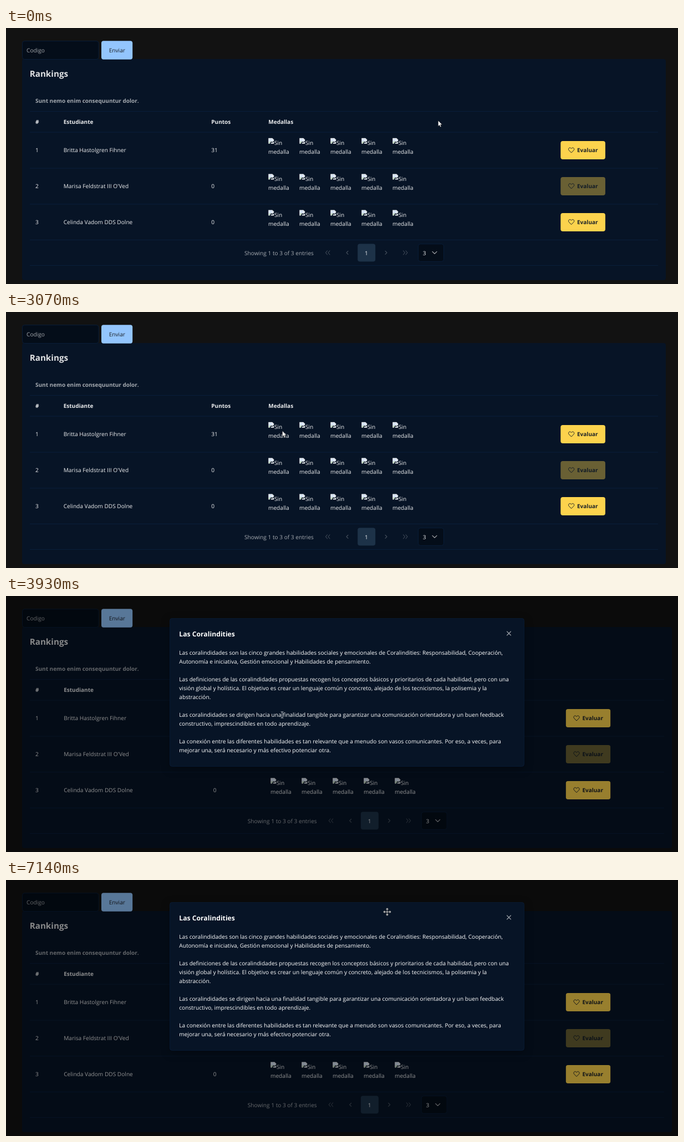
An HTML page for the animation above (7.39 s loop, 1212 by 462 pixels).

```html
<!DOCTYPE html>
<html lang="es">
<head>
<meta charset="utf-8">
<title>Rankings</title>
<style>
  html, body { margin: 0; width: 100%; height: 100%; overflow: hidden; background: #121212; }
  svg { display: block; width: 100vw; height: 100vh; }
  text { font: 10.15px "Open Sans", "Noto Sans", sans-serif; fill: #fff; fill-opacity: .93; text-rendering: geometricPrecision; }
  .b { font-weight: 700; font-size: 10px; }
  .dim { fill-opacity: .64; }
  .dark { fill: #1c2127; fill-opacity: 1; }
  .h1 { font-size: 15.2px; font-weight: 700; fill-opacity: .88; }
  .h2 { font-size: 12.2px; font-weight: 700; }
  .mid { text-anchor: middle; }
  .line { fill: #0b213f; }
  .field { fill: #040d19; stroke: #0b213f; stroke-width: .8; }
  .ico { fill: none; stroke: #fff; stroke-opacity: .6; stroke-width: 1.1; stroke-linecap: round; stroke-linejoin: round; }
  .off { opacity: .4; }

  .shift, .grow, #mask, #dialog, #cursor, #cursor > * { animation: 7390ms linear infinite; }
  .shift { animation-name: shift; }
  .grow { width: var(--w); animation-name: grow; }
  #mask { animation-name: mask; }
  #dialog { animation-name: open; transform-origin: 615px 174px; }
  #dialog text { fill-opacity: 1; }
  #panel { fill: #071426; stroke: #0b213f; stroke-width: .7; filter: drop-shadow(0 4px 8px rgba(0, 0, 0, .3)); }
  #cursor { animation-name: travel; }
  #cursor > * { animation-timing-function: step-end; }
  #arrow { animation-name: arrow; }
  #beam { animation-name: beam; }
  #move { animation-name: move; }

  /* the page widens when its scrollbar goes away */
  @keyframes shift {
    0%, 41.812% { transform: none; }
    41.813%, 100% { transform: translateX(var(--d)); }
  }
  @keyframes grow {
    0%, 41.812% { width: var(--w); }
    41.813%, 100% { width: calc(var(--w) + 11px); }
  }
  @keyframes mask {
    0% { opacity: 0; }
    42.2% { opacity: 0; animation-timing-function: ease; }
    43.9%, 100% { opacity: .4; }
  }
  @keyframes open {
    0% { opacity: 0; transform: scale(.7); }
    42.165% { opacity: 0; transform: scale(.7); animation-timing-function: cubic-bezier(0, 0, .2, 1); }
    43.802%, 100% { opacity: 1; transform: none; }
  }
  @keyframes travel {
    0%, 11.231% { transform: translate(779px, 167px); }
    16% { transform: translate(662px, 163px); }
    20.974%, 21.245% { transform: translate(555px, 166px); }
    24.493%, 25.846% { transform: translate(530px, 182px); }
    30.988%, 31.258% { transform: translate(527px, 264px); }
    35.183% { transform: translate(476px, 234px); }
    38.5% { transform: translate(492px, 207px); }
    40.189%, 53.18% { transform: translate(498px, 214.5px); }
    62.923%, 64.275% { transform: translate(507px, 181px); }
    64.276%, 64.54% { transform: translate(509px, 175px); }
    73.748%, 75.101% { transform: translate(580.5px, 79.5px); }
    81.597%, 81.867% { transform: translate(654.5px, 52px); }
    84.844%, 85.115% { transform: translate(671px, 52px); }
    89.445%, 93.64% { transform: translate(697px, 55px); }
    96.617%, 100% { transform: translate(687.5px, 57.5px); }
  }
  @keyframes arrow {
    0%, 55.548%, 67.524% { visibility: visible; }
    42.111%, 64.55%, 69.107%, 100% { visibility: hidden; }
  }
  @keyframes beam {
    0%, 55.548%, 67.524%, 72.273%, 100% { visibility: hidden; }
    42.111%, 64.55%, 69.107% { visibility: visible; }
  }
  @keyframes move {
    0% { visibility: hidden; }
    72.273%, 100% { visibility: visible; }
  }
</style>
</head>
<body>
<svg viewBox="0 0 1212 462">
  <defs>
    <g id="broken">
      <path d="M.3.3H7.3L10.3 3.3V5L7.4 7.2 5 6.2 2.6 10.3H.3Z" fill="#f4f6f8"/>
      <path d="M1.4 1.4H6.8V4H9.2V4.7L7.2 6.1 5 5.1 1.4 7.5Z" fill="#d3e2f6"/>
      <path d="M1.4 9.3V7.8L4.2 5.6 2.4 9.3Z" fill="#8fc183"/>
      <path d="M7.3.3V3.3H10.3Z" fill="#d5d9de"/>
      <path d="M4.4 10.3 6 7.8 7.6 8.6 10.3 6.6V10.3Z" fill="#eceff2"/>
    </g>
    <path id="heart" d="M5.3 9.6 1 5.2C-.6 3.5.3.6 2.7.6 4 .6 4.8 1.4 5.3 2.2 5.8 1.4 6.6.6 7.9.6 10.3.6 11.2 3.5 9.6 5.2Z" fill="none" stroke="#1c2127"/>
  </defs>

  <rect width="1212" height="462" fill="#121212"/>
  <rect class="grow" style="--w:1161px" x="29" y="56" height="399" rx="4" fill="#071426"/>
  <rect class="field" x="29.5" y="23.5" width="137.5" height="33" rx="4"/>
  <text class="dim" x="37" y="44">Codigo</text>
  <rect x="172" y="23.3" width="56.2" height="33.4" rx="4" fill="#93c5fd"/>
  <text class="dark mid" x="200.3" y="44">Enviar</text>
  <text class="h1" x="42.7" y="88.2">Rankings</text>
  <text class="b dim" x="53" y="135">Sunt nemo enim consequuntur dolor.</text>
  <g id="table"></g>

  <g class="shift" style="--d:5.7px">
    <text class="dim" x="430" y="409.5">Showing 1 to 3 of 3 entries</text>
    <g class="off">
      <path class="ico" d="M579.5 402 576.5 405.5 579.5 409M584 402 581 405.5 584 409"/>
      <path class="ico" d="M617 402.5 614 405.5 617 408.5"/>
      <path class="ico" d="M684 402.5 687 405.5 684 408.5"/>
      <path class="ico" d="M716.5 402 719.5 405.5 716.5 409M721 402 724 405.5 721 409"/>
    </g>
    <rect x="634.2" y="389.6" width="32" height="31.8" rx="4" fill="#1d3248"/>
    <text class="mid" x="650" y="409.5">1</text>
    <rect class="field" x="743.5" y="389.8" width="46" height="31.6" rx="4"/>
    <text x="751.7" y="409.5">3</text>
    <path class="ico" d="M769 403.5 773 407.5 777 403.5"/>
  </g>

  <rect id="mask" width="1212" height="462"/>

  <g id="dialog">
    <rect id="panel" x="295.6" y="40.4" width="638.8" height="267" rx="4"/>
    <text class="h2" x="312.3" y="72.5">Las Coralindities</text>
    <path class="ico" d="M903.5 64 910.5 71M910.5 64 903.5 71"/>
    <g id="body"></g>
  </g>

  <g id="cursor">
    <path id="arrow" d="M.4 0V10.4L2.8 8.2 4.3 11.8 6 11.1 4.5 7.5H7.7Z" fill="#fff" stroke="#000" stroke-width=".5"/>
    <path id="beam" d="M-2.3-5.5H-.6L0-5 .6-5.5H2.3M0-5V5M-2.3 5.5H-.6L0 5 .6 5.5H2.3" fill="none" stroke="#e4e6e9" stroke-width=".9"/>
    <path id="move" d="M0-7.2 2.8-4.2H.7V-.7H4.2V-2.8L7.2 0 4.2 2.8V.7H.7V4.2H2.8L0 7.2-2.8 4.2H-.7V.7H-4.2V2.8L-7.2 0-4.2-2.8V-.7H-.7V-4.2H-2.8Z" fill="#fff" stroke="#000" stroke-width=".5"/>
  </g>
</svg>
<script>
  const rows = [
    ["Britta Hastolgren Fihner", 31],
    ["Marisa Feldstrat III O'Ved", 0],
    ["Celinda Vadom DDS Dolne", 0]
  ];
  // line number in the dialog, then its text
  const lines = [
    [0, "Las coralindidades son las cinco grandes habilidades sociales y emocionales de Coralindities: Responsabilidad, Cooperación,"],
    [1, "Autonomía e iniciativa, Gestión emocional y Habilidades de pensamiento."],
    [3, "Las definiciones de las coralindidades propuestas recogen los conceptos básicos y prioritarios de cada habilidad, pero con una"],
    [4, "visión global y holística. El objetivo es crear un lenguaje común y concreto, alejado de los tecnicismos, la polisemia y la"],
    [5, "abstracción."],
    [7, "Las coralindidades se dirigen hacia una finalidad tangible para garantizar una comunicación orientadora y un buen feedback"],
    [8, "constructivo, imprescindibles en todo aprendizaje."],
    [10, "La conexión entre las diferentes habilidades es tan relevante que a menudo son vasos comunicantes. Por eso, a veces, para"],
    [11, "mejorar una, será necesario y más efectivo potenciar otra."]
  ];

  const text = (x, y, s, cls = "") => `<text class="${cls}" x="${x}" y="${y}">${s}</text>`;
  const shift = (d, inner) => `<g class="shift" style="--d:${d}px">${inner}</g>`;
  const rule = y => `<rect class="line grow" style="--w:1133px" x="43" y="${y}" height=".8"/>`;

  const medal = (x, y) =>
    `<use href="#broken" x="${x}" y="${y - 25.5}"/>` +
    text(x + 11, y - 13, "Sin") + text(x, y + 3, "medalla");

  const button = (y, off) =>
    `<g class="${off ? "off" : ""}">
      <rect x="1000.3" y="${Math.round(y - 20)}" width="80.6" height="33" rx="4" fill="#fcd34d"/>
      <use href="#heart" x="1014.3" y="${y - 8.5}"/>${text(1030, y, "Evaluar", "b dark")}
    </g>`;

  const row = ([name, points], i) => {
    const y = 224 + i * 64.8;
    const medals = [0, 1, 2, 3, 4].map(k => medal(473 + k * 56, y)).join("");
    return text(53, y, i + 1) +
      shift(.5, text(103.7, y, name)) +
      shift(3.5, text(370.3, y, points)) +
      shift(4, medals) +
      shift(9.4, button(y, i === 1));
  };

  document.getElementById("table").innerHTML =
    [150, 187.7, 252.7, 317.5, 382, 428].map(rule).join("") +
    text(53, 173, "#", "b") +
    shift(.5, text(103.7, 173, "Estudiante", "b")) +
    shift(3.5, text(370.3, 173, "Puntos", "b")) +
    shift(4, text(473.3, 173, "Medallas", "b")) +
    rows.map(row).join("");

  document.getElementById("body").innerHTML =
    lines.map(([n, s]) => text(312.3, 105.8 + n * 16, s)).join("");
</script>
</body>
</html>
```
